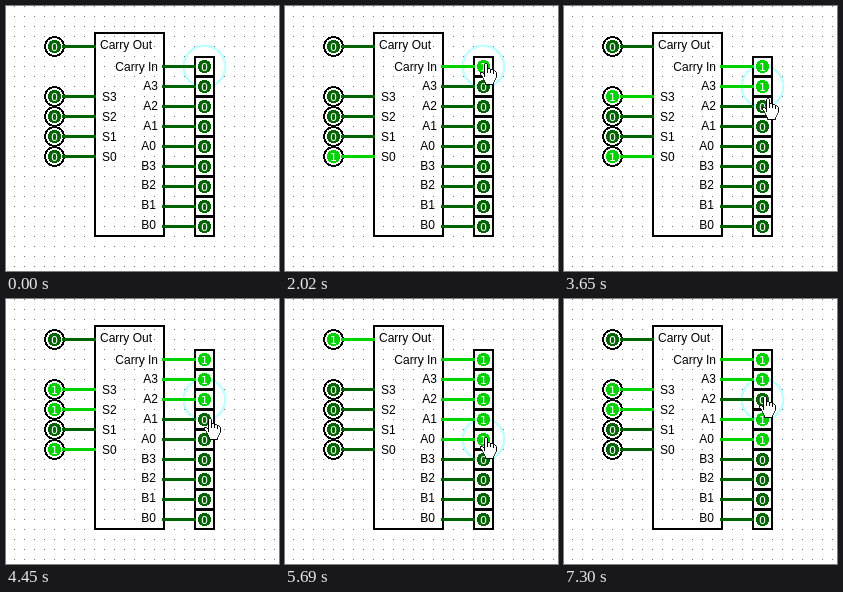
Recreate the animation shown at these times as an HTML page with a canvas. Size 273 by 265 pixels, loop 8 s.

```html
<!DOCTYPE html>
<html>
<head>
<meta charset="utf-8">
<title>Four-bit adder</title>
<style>
html, body { margin: 0; width: 273px; height: 265px; overflow: hidden; background: #fff; }
canvas { display: block; }
</style>
</head>
<body>
<canvas id="stage" width="273" height="265"></canvas>
<script>
const g = document.getElementById('stage').getContext('2d');
const LOOP = 8000, STEP = 202.5;
const inputNames = ['Carry In', 'A3', 'A2', 'A1', 'A0', 'B3', 'B2', 'B1', 'B0'];
const outputNames = ['Carry Out', 'S3', 'S2', 'S1', 'S0'];
const inputY = i => 60 + 20 * i;
const outputY = i => i ? 70 + 20 * i : 40;
const colour = bit => bit ? '#00d200' : '#006400';

// Times are counted in steps.
const clicks = [[9, 0], [17, 1], [20, 2], [24, 3], [27, 4], [36, 2]];
const handPath = [
  [2, 238, 241], [7, 199, 61], [8, 195, 57], [14, 195, 57], [18, 198, 92],
  [22, 198, 119], [26, 195, 138], [32, 195, 138], [33, 195, 117], [35, 195, 97]
];

const handShape = new Path2D('M4.5 14V1.5L5.5 .5H6.5L7.5 1.5V5.5H9.5L10.5 6.5H12.5L13.5 7.5H14.5L16.5 9.5' +
  'V14.5L15.5 15.5V16.5L14.5 17.5V18.5L13.5 19.5V21.5H5.5V19.5L4.5 18.5V17.5L3.5 16.5V15.5' +
  'L2.5 14.5V13.5L.5 11.5V9.5H2.5L4.5 11.5Z');
const handCreases = new Path2D('M7.5 5V10M10.5 6V10M13.5 7V11M4.5 10V14');

// Hard-edged ring or disc made of whole pixels.
function ring(cx, cy, inner, outer, fill) {
  g.fillStyle = fill;
  const r = Math.ceil(outer);
  for (let y = -r; y <= r; y++)
    for (let x = -r; x <= r; x++) {
      const d = Math.hypot(x, y);
      if (d >= inner && d <= outer) g.fillRect(cx + x, cy + y, 1, 1);
    }
}

function write(text, x, y, align, fill, font = '12px "Liberation Sans", Arial, sans-serif') {
  g.font = font;
  g.textAlign = align;
  g.fillStyle = fill;
  g.fillText(text, x, y);
}

function wire(x, y, bit) {
  g.fillStyle = colour(bit);
  g.fillRect(x, y - 1, 34, 3);
}

function value(x, y, bit) {
  ring(x, y, 0, 6.5, colour(bit));
  write(bit, x + .5, y + 4.5, 'center', '#fff', '11px "DejaVu Sans", sans-serif');
}

function drawGrid() {
  g.fillStyle = '#fff';
  g.fillRect(0, 0, 273, 265);
  g.fillStyle = '#777';
  for (let x = 8; x < 273; x += 10)
    for (let y = 0; y < 265; y += 10) g.fillRect(x, y, 1, 1);
}

function drawHand(step) {
  const next = handPath.findIndex(([time]) => time > step);
  if (next === 0) return;
  const to = handPath.at(next), from = next < 0 ? to : handPath[next - 1];
  const part = next < 0 ? 0 : (step - from[0]) / (to[0] - from[0]);
  const at = k => Math.round(from[k] + (to[k] - from[k]) * part);
  g.save();
  g.translate(at(1), at(2));
  g.lineWidth = 1;
  g.fillStyle = '#fff';
  g.fill(handShape);
  g.stroke(handShape);
  g.stroke(handCreases);
  g.restore();
}

function draw(t) {
  const step = Math.floor((t + 10) / STEP);
  const inputs = Array(9).fill(0);
  let selected = 0;
  for (const [time, pin] of clicks) {
    if (time > step) break;
    inputs[pin] ^= 1;
    selected = pin;
  }
  const number = bits => bits.reduce((n, bit) => 2 * n + bit, 0);
  const sum = inputs[0] + number(inputs.slice(1, 5)) + number(inputs.slice(5));

  drawGrid();
  ring(198, inputY(selected), 19.5, 22, '#c0ffff');
  g.strokeStyle = '#000';
  g.lineWidth = 2;
  g.strokeRect(89, 27, 69, 203);

  outputNames.forEach((name, i) => {
    const y = outputY(i), bit = sum >> (4 - i) & 1;
    ring(48, y, 8.5, 10.4, '#000');
    wire(56, y, bit);
    value(48, y, bit);
    write(name, i ? 96 : 94, i ? y + 5 : y + 3, 'left', '#000');
  });
  inputNames.forEach((name, i) => {
    const y = inputY(i);
    g.strokeRect(189, y - 9, 19, 19);
    wire(156, y, inputs[i]);
    value(198, y, inputs[i]);
    write(name, i < 4 ? 152 : 150, Math.floor(65 + 19.8 * i), 'right', '#000');
  });
  drawHand(step);
}

const start = performance.now();
function tick() {
  draw((performance.now() - start) % LOOP);
  requestAnimationFrame(tick);
}
tick();
</script>
</body>
</html>
```
